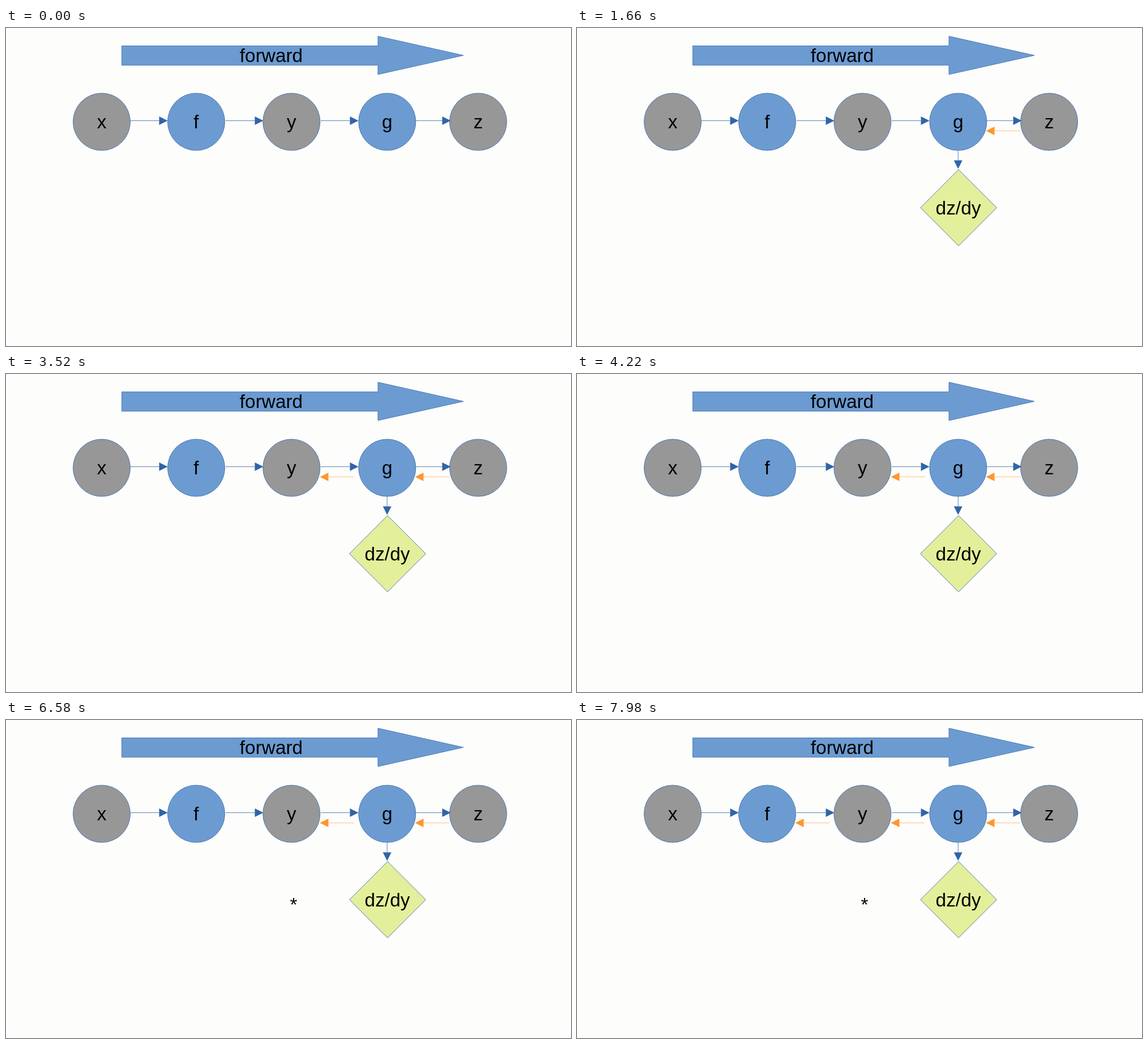
An HTML page for the animation above (8000 ms loop, 998x561 px).

```html
<!DOCTYPE html>
<html lang="en">
<head>
<meta charset="utf-8">
<style>
  html, body { margin: 0; width: 100%; height: 100%; overflow: hidden; background: #fdfdfb; }
  svg { display: block; width: 998px; height: 561px; }
  text { font: 33.4px "Liberation Sans", Arial, sans-serif; text-anchor: middle; fill: #000; }
  .shape { stroke: #4a7ab8; stroke-width: 1; }
  .blue { fill: #6c9bd1; }
  .gray { fill: #979797; }
  .lime { fill: #e4ef9b; }
  .next { stroke: #5f86ba; fill: #3164a8; }
  .back { stroke: #ffbd80; fill: #ff952e; }
  .next path, .back path { stroke: none; }
</style>
</head>
<body>
<svg viewBox="0 0 998 561">
  <path class="shape blue" d="M204.5 31.5H657V14.5L808 48.3L657 82V65.7H204.5Z"/>
  <text x="468.5" y="60">forward</text>
  <g id="graph"></g>
</svg>
<script>
const DURATION = 8000;
const graph = document.getElementById('graph');
const steps = [];

// Adds markup that stays hidden until the given time in the loop.
function add(markup, start = 0) {
  graph.insertAdjacentHTML('beforeend', `<g>${markup}</g>`);
  steps.push({ element: graph.lastElementChild, start });
}

// An arrow of the given length, drawn from its tail and turned by an angle.
function arrow(type, x, y, length, angle) {
  const neck = length - 15;
  return `<g class="${type}" transform="translate(${x} ${y}) rotate(${angle})">
    <line x2="${neck}"/><path d="M${neck} -7.5L${length} 0L${neck} 7.5Z"/></g>`;
}

const label = (text, x, y) => `<text x="${x}" y="${y}">${text}</text>`;

const nodes = [['x', 169], ['f', 336], ['y', 504.3], ['g', 673.3], ['z', 834]];
nodes.forEach(([name, x], i) => add(
  `<circle class="shape ${i % 2 ? 'blue' : 'gray'}" cx="${x}" cy="165.5" r="50.5"/>` +
  label(name, x, 177)));

for (const [from, to] of [[220, 285.5], [388, 454.5], [556, 622.5], [720, 785.5]]) {
  add(arrow('next', from, 163.5, to - from, 0));
}

add(arrow('back', 783, 181.5, 60.5, 180), 20);
add(arrow('next', 673.2, 216, 32.5, 90) +
  '<path class="shape lime" d="M674 249.7L741.3 317L674 384.3L606.7 317Z"/>' +
  label('dz/dy', 673.5, 328.5), 1660);
add(arrow('back', 614.5, 181.5, 60, 180), 3400);
add(label('*', 508, 337), 5100);
add(arrow('back', 446, 181.5, 60.5, 180), 6800);

function draw(now) {
  const time = now % DURATION;
  for (const { element, start } of steps) {
    element.style.visibility = time >= start ? 'visible' : 'hidden';
  }
  requestAnimationFrame(draw);
}
draw(performance.now());
</script>
</body>
</html>
```
